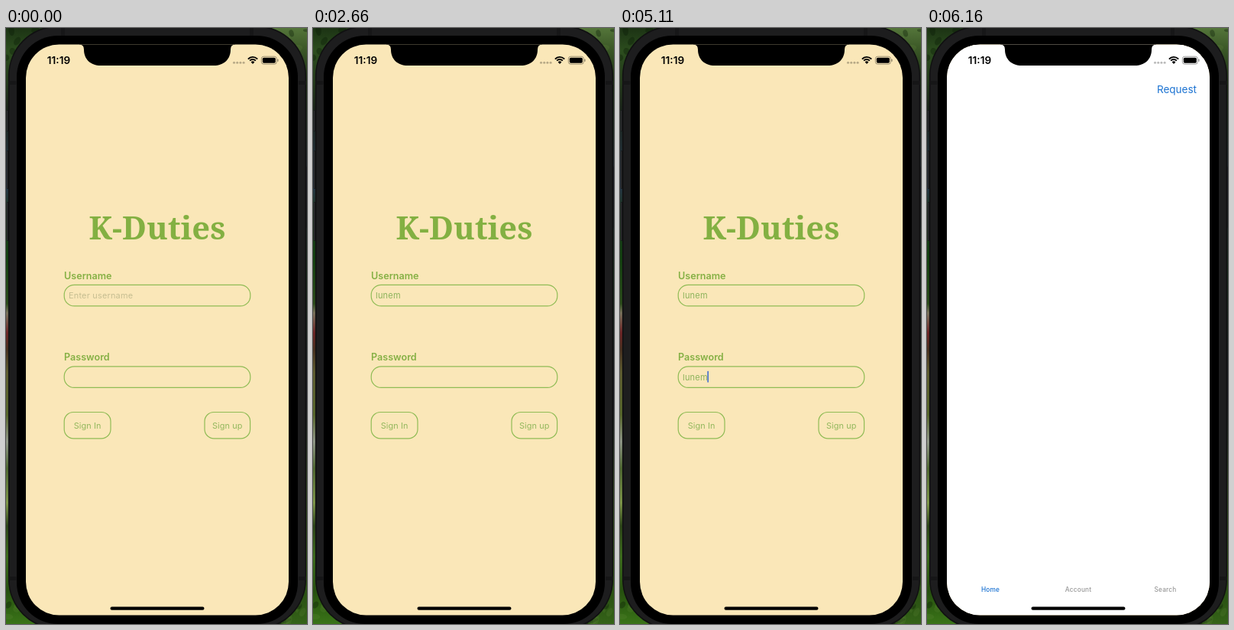
Recreate the animation shown at these times as an HTML page with a canvas. Size 394 px wide and 778 px high, loop 8 s.

```html
<!DOCTYPE html>
<html lang="en">
<head>
<meta charset="utf-8">
<title>Sign in</title>
<style>
html, body { margin: 0; width: 100%; height: 100%; overflow: hidden; background: #000; }
canvas { display: block; width: 100vw; height: 100vh; }
</style>
</head>
<body>
<canvas id="stage"></canvas>
<script>
const W = 394, H = 778, LOOP = 8000, STEP = 70;
const SANS = 'Inter, Roboto, sans-serif';
const CREAM = '#fae7b8', GREEN = '#85b044', LINE = '#90bc55', BLUE = '#1c73d2';
const SCREEN = { x: 26, y: 21.5, w: 344, h: 745, r: 43.5 };
const NAME = 'lunem';
const USER_KEYS = [1890, 1960, 2100, 2170, 2310];
const PASS_KEYS = [3570, 3640, 3710, 3780, 3920];
const USER_CARET = [[1750, 2660], [2870, 3290]];
const PASS_CARET = [[3290, 4340], [4480, 4830], [5040, 5180]];
const PRESS = [4900, 5110];
const SLIDE_START = 5145, SLIDE_END = 5740, SLIDE_RATE = 0.01488;

const canvas = document.getElementById('stage');
const ctx = canvas.getContext('2d');
const dpr = window.devicePixelRatio || 1;
canvas.width = W * dpr;
canvas.height = H * dpr;

const within = (t, spans) => spans.some(([a, b]) => t >= a && t < b);
const typed = (t, keys) => NAME.slice(0, keys.filter(k => t >= k).length);

function box(x, y, w, h, r) {
  ctx.beginPath();
  ctx.roundRect(x, y, w, h, r);
}

function fillBox(color, x, y, w, h, r = 0) {
  ctx.fillStyle = color;
  box(x, y, w, h, r);
  ctx.fill();
}

function outline(x, y, w, h, r) {
  ctx.strokeStyle = LINE;
  ctx.lineWidth = 1.2;
  box(x, y, w, h, r);
  ctx.stroke();
}

function setFont(size, weight = 400, family = SANS, tracking = 0) {
  ctx.font = `${weight} ${size}px ${family}`;
  ctx.letterSpacing = `${tracking * size}px`;
}

function text(str, x, y, size, color, { weight, align = 'left', family, tracking } = {}) {
  setFont(size, weight, family, tracking);
  ctx.textAlign = align;
  ctx.fillStyle = color;
  ctx.fillText(str, x, y);
}

function gradient(stops) {
  const g = ctx.createLinearGradient(0, 0, 0, H);
  stops.forEach(([y, c]) => g.addColorStop(y / H, c));
  return g;
}

const LEFT = gradient([
  [0, '#1c3314'], [30, '#2c4d1e'], [70, '#243a1b'], [105, '#1a2419'], [205, '#263548'],
  [235, '#1d3522'], [300, '#12400f'], [360, '#2a4a1a'], [372, '#77705a'], [398, '#6b2425'],
  [420, '#47301f'], [450, '#5d5c30'], [505, '#55652a'], [540, '#8d9485'], [575, '#4d6630'],
  [620, '#7c9448'], [650, '#2b4317'], [690, '#3c6b1c'], [735, '#26500f'], [778, '#3a7418']
]);
const RIGHT = gradient([
  [0, '#54753a'], [25, '#3d5a28'], [70, '#1c3015'], [200, '#20242f'], [320, '#16291a'],
  [480, '#17181f'], [600, '#2c4020'], [700, '#2a4a16'], [750, '#2c5514'], [778, '#356318']
]);

// Blurred foliage behind the phone
function drawLeaves() {
  fillBox(LEFT, 0, 0, W / 2, H);
  fillBox(RIGHT, W / 2, 0, W / 2, H);
  let seed = 7;
  const rnd = () => (seed = seed * 16807 % 2147483647) / 2147483647;
  for (let i = 0; i < 48; i++) {
    const x = (i % 2 ? W - 42 : 0) + rnd() * 42;
    const y = (i % 4 < 2 ? 0 : H - 42) + rnd() * 42;
    ctx.fillStyle = rnd() < 0.6 ? 'rgba(10,26,6,.35)' : 'rgba(110,150,70,.16)';
    ctx.beginPath();
    ctx.ellipse(x, y, 3 + rnd() * 6, 2 + rnd() * 3, rnd() * 3, 0, 7);
    ctx.fill();
  }
}

function drawBody() {
  for (const [y, h] of [[107, 28], [160, 50], [227, 51]]) {
    fillBox('#18191b', 0.5, y, 6, h, 2);
    fillBox('#303133', 1, y + 1, 1, h - 2);
  }
  fillBox('#151517', 388, 180, 5.5, 82, 2);
  fillBox('#101011', 3, -3, 390, 788, 65);
  fillBox('#1d1d1e', 4.5, -1, 387, 784, 63);
  for (const y of [69, 716]) {
    fillBox('#161617', 3.5, y, 10, 5);
    fillBox('#161617', 383, y, 10, 5);
  }
  fillBox('#171718', 72, 0, 5, 10);
  fillBox('#171718', 319, 0, 5, 10);
  fillBox('#000', 14, 10, 368, 768, 54);
}

function field(y, value, caret, hint) {
  outline(76.2, y, 243.6, 27.6, 13);
  const base = y + 18;
  if (value) text(value, 82, base, 11, '#8db35b', { tracking: 0.02 });
  else if (hint) text(hint, 82, base, 10.9, '#c6be91', { tracking: 0.02 });
  if (caret) {
    setFont(11, 400, SANS, 0.02);
    fillBox('#4b73cf', 81.5 + ctx.measureText(value).width, y + 6, 1.7, 15, 0.8);
  }
}

function button(label, x, w, pressed) {
  outline(x, 501.5, w, 34.3, 12);
  ctx.globalAlpha = pressed ? 0.35 : 1;
  text(label, x + w / 2, 522.8, 10.9, '#93b85d', { align: 'center', tracking: 0.01 });
  ctx.globalAlpha = 1;
}

function drawLogin(t) {
  text('K-Duties', 198, 275.5, 41.7, '#83b042',
    { weight: 900, align: 'center', family: '"Noto Serif", serif' });
  text('Username', 76, 327.5, 12.6, GREEN, { weight: 600 });
  field(335.3, typed(t, USER_KEYS), within(t, USER_CARET), 'Enter username');
  text('Password', 76, 433.7, 12.6, GREEN, { weight: 600 });
  field(441.8, typed(t, PASS_KEYS), within(t, PASS_CARET));
  button('Sign In', 76.2, 60.8, within(t, [PRESS]));
  button('Sign up', 260, 59.6, false);
}

// Critically damped spring from the bottom edge up
function sheetTop(t) {
  const s = (t - SLIDE_START) * SLIDE_RATE;
  return t >= SLIDE_END ? SCREEN.y : SCREEN.y + SCREEN.h * (1 + s) * Math.exp(-s);
}

function drawSheet(top) {
  fillBox('#fff', SCREEN.x, top, SCREEN.w, SCREEN.h);
  text('Request', 353, top + 63.6, 13.5, BLUE, { align: 'right' });
  [['Home', 83, BLUE], ['Account', 198, '#989898'], ['Search', 312, '#989898']]
    .forEach(([label, x, color]) =>
      text(label, x, top + 714.2, 8.3, color, { weight: 500, align: 'center', tracking: 0.02 }));
}

function drawNotch() {
  ctx.fillStyle = '#000';
  ctx.beginPath();
  ctx.moveTo(96, 20);
  ctx.lineTo(96, 21.5);
  ctx.quadraticCurveTo(102, 21.5, 102, 28);
  ctx.bezierCurveTo(102, 41, 111, 49, 124, 49);
  ctx.lineTo(272, 49);
  ctx.bezierCurveTo(285, 49, 294, 41, 294, 28);
  ctx.quadraticCurveTo(294, 21.5, 300, 21.5);
  ctx.lineTo(300, 20);
  ctx.fill();
}

function drawStatus() {
  text('11:19', 69, 47, 13.6, '#000', { weight: 600, align: 'center' });
  for (let i = 0; i < 4; i++) fillBox('rgba(0,0,0,.27)', 297 + i * 4.2, 43.7, 3, 3, 1.5);
  ctx.strokeStyle = '#000';
  ctx.lineWidth = 1.9;
  for (const r of [8.4, 5.3]) {
    ctx.beginPath();
    ctx.arc(323, 46.3, r, -Math.PI * 0.76, -Math.PI * 0.24);
    ctx.stroke();
  }
  ctx.fillStyle = '#000';
  ctx.beginPath();
  ctx.moveTo(323, 47);
  ctx.arc(323, 46.6, 3.2, -Math.PI * 0.76, -Math.PI * 0.24);
  ctx.fill();
  ctx.strokeStyle = 'rgba(0,0,0,.38)';
  ctx.lineWidth = 1;
  box(334.3, 37.2, 20, 10, 3);
  ctx.stroke();
  fillBox('#000', 335.8, 38.7, 17, 7, 1.6);
  fillBox('rgba(0,0,0,.4)', 355.3, 40.6, 1.3, 3.4, 0.7);
  fillBox('#000', 136.5, 755.6, 123, 4.2, 2.1);
}

function draw(t) {
  ctx.setTransform(dpr, 0, 0, dpr, 0, 0);
  drawLeaves();
  drawBody();
  ctx.save();
  box(SCREEN.x, SCREEN.y, SCREEN.w, SCREEN.h, SCREEN.r);
  ctx.clip();
  ctx.fillStyle = CREAM;
  ctx.fillRect(0, 0, W, H);
  drawLogin(t);
  if (t >= SLIDE_START) drawSheet(sheetTop(t));
  drawNotch();
  drawStatus();
  ctx.restore();
}

const start = performance.now();
function tick() {
  const t = (performance.now() - start) % LOOP;
  draw(Math.floor(t / STEP) * STEP);
  requestAnimationFrame(tick);
}
tick();
</script>
</body>
</html>
```
